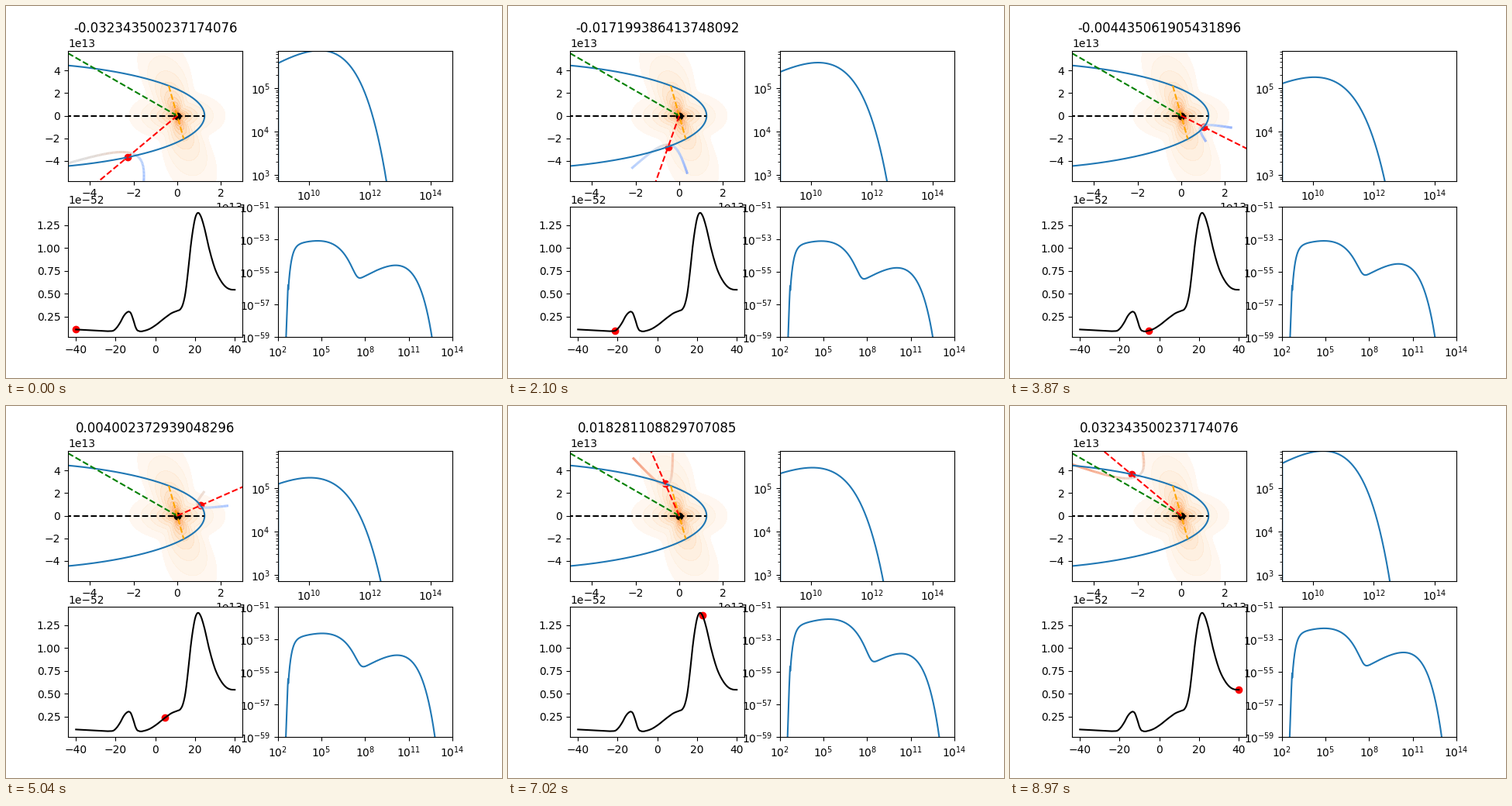
These frames come from a looping animation (640x480 px, 9000 ms). A matplotlib script:

```python
import numpy as np
import matplotlib.pyplot as plt
from matplotlib.animation import FuncAnimation
from matplotlib.collections import LineCollection

FRAMES = 300
PERIOD = 1236.724526          # days
ECC, AXIS = 0.87, 9.64e13     # orbit shape, cm
LATUS = AXIS * (1 - ECC**2)
DISK = np.radians(98.3)
DISK_WIDTH, DISK_GAIN = np.radians(10), 9.5
OBSERVER = np.array([-5, 5.53]) / np.hypot(5, 5.53)
LN10 = np.log(10)


def hermite(x, xs, ys):
    """Smooth curve through a few points."""
    xs, ys = np.asarray(xs, float), np.asarray(ys, float)
    m = np.gradient(ys, xs)
    i = np.clip(np.searchsorted(xs, x) - 1, 0, len(xs) - 2)
    h = xs[i + 1] - xs[i]
    u = (x - xs[i]) / h
    return ((1 + 2 * u) * (1 - u)**2 * ys[i] + u * (1 - u)**2 * h * m[i]
            + u**2 * (3 - 2 * u) * ys[i + 1] + u**2 * (u - 1) * h * m[i + 1])


def position(phase):
    mean = 1.042 * 2 * np.pi * phase
    E = np.sign(mean) * np.abs(6 * mean)**(1 / 3)
    for _ in range(40):
        E = E - (E - ECC * np.sin(E) - mean) / (1 - ECC * np.cos(E))
    return AXIS * np.column_stack([np.cos(E) - ECC,
                                   np.sqrt(1 - ECC**2) * np.sin(E)])


def disk_weight(angle):
    off = np.arcsin(np.sin(angle - DISK))
    return np.exp(-off**2 / (2 * DISK_WIDTH**2))


def polar(r, angle):
    return r * np.cos(angle), r * np.sin(angle)


def hump(w, c, q):
    """Drop in decades away from a peak: power law left, cutoff right."""
    return c * (10**(q * w) - 1 - q * w * LN10)


def shock(pos, weight):
    """Both arms of the wind collision surface, with line colours."""
    D = np.hypot(*pos)
    d = pos / D
    n = np.array([-d[1], d[0]])
    beta = 1 / (94 * (1 + DISK_GAIN * weight))
    t1 = np.linspace(0.01, np.pi - 0.06, 500)
    R = beta * (1 - t1 / np.tan(t1))
    t2 = np.sqrt(7.5 * (np.sqrt(1 + 0.8 * R) - 1))
    keep = t1 + t2 < np.pi - 0.05
    t1, t2 = t1[keep], t2[keep]
    r = np.sin(t2) / np.sin(t1 + t2)
    along, across = 1 - r * np.cos(t1), r * np.sin(t1)
    s = np.r_[0, np.cumsum(np.hypot(np.diff(along), np.diff(across)))]
    grid = np.linspace(0, 1, 50)
    along, across = np.interp(grid, s, along), np.interp(grid, s, across)
    gamma = 1 + 0.2 * (grid[1:] + grid[:-1]) / 2
    speed = np.sqrt(1 - gamma**-2)
    segs, cols = [], []
    for side in (1, -1):
        p = D * (along[:, None] * d + side * across[:, None] * n)
        step = np.diff(p, axis=0)
        cosine = step @ OBSERVER / np.hypot(*step.T)
        doppler = 1 / (gamma * (1 - speed * cosine))
        segs.append(np.stack([p[:-1], p[1:]], axis=1))
        cols.append(plt.cm.coolwarm(0.5 + 0.5 * np.log(doppler)))
    return np.concatenate(segs), np.concatenate(cols)


# light curve, units of 1e-52
LC_T = [-40, -35, -28, -23, -21, -19.4, -17.3, -16.1, -14.6, -13.3, -12.4,
        -11.2, -10, -9.2, -8.3, -5.2, -3, 0, 4.9, 8, 11, 12.6, 13.8, 15,
        16.5, 17.7, 19, 20.2, 21.4, 22.8, 24.4, 27, 30, 33, 36, 38, 40]
LC_V = [.108, .102, .094, .0905, .097, .13, .2, .25, .29, .303, .288,
        .22, .135, .102, .091, .096, .113, .153, .237, .285, .313, .33, .38, .49,
        .75, 1.0, 1.21, 1.34, 1.385, 1.352, 1.245, 1.0, .775, .64, .565, .546, .543]

days = np.linspace(-40, 40, FRAMES)
phases = days / PERIOD
track = position(phases)
dist = np.log10(np.hypot(*track.T) / 1e13)
weights = disk_weight(np.arctan2(track[:, 1], track[:, 0]))
flux = hermite(days, LC_T, LC_V)

# peaks of the two humps of the photon spectrum
KEYS = [-40, -28.2, -14.6, -5.2, 4.9, 22.8, 40]
syn_pos = np.interp(days, [-40, -28, -5, 5, 40],
                    [4.74, 4.74, 4.9, 5.06, 4.9]) + 0.45 * weights
syn_top = np.log10(flux) - 52.12 + 0.36 * (syn_pos - 4.74)
ic_pos = hermite(days, KEYS, [10.1, 10.05, 10.05, 10.02, 10.2, 10.345, 10.365])
ic_top = hermite(days, KEYS, [-54.59, -54.61, -54.8, -54.49, -53.97, -53.87, -53.8])

energy = np.linspace(2.3, 14, 900)
lorentz = np.linspace(0, 4.5, 250)


def photons(i):
    v = energy
    g = weights[i]
    low = 5.4 * 10**(-2.1 * (v - 2.585))
    bump = np.where(v < 2.725, 0.45 * np.clip((v - 2.6) / 0.1, 0, 1), 0)
    syn = (syn_top[i] + bump - low
           - hump(v - syn_pos[i], 0.32 + 0.08 * g, 0.39 - 0.04 * g))
    ic = ic_top[i] - hump(v - ic_pos[i], 0.57, 0.42) - low / 3
    return np.maximum(10**syn + 10**ic, 1e-70)


def electrons(i):
    l, g = dist[i], weights[i]
    top = 5.047 + 1.29 * l - 0.19 * g
    start = 4.95 + 0.984 * l - 0.075 * g
    peak = min(1.05 + 0.82 * (l - 0.158), 1.36) - 0.27 * g
    q = 0.425 + 0.09 * (l - 0.158) + 0.025 * g
    c = (top - start) / hump(-peak, 1, q)
    y = 10**np.maximum(top - hump(lorentz - peak, c, q), 0)
    return np.r_[1, y]


fig, ((ax, ax_e), (ax_l, ax_s)) = plt.subplots(2, 2, figsize=(6.4, 4.8), dpi=100)

# orbit view
gx, gy = np.meshgrid(np.linspace(-5e13, 3e13, 240), np.linspace(-5.8e13, 5.8e13, 240))
gr = np.maximum(np.hypot(gx, gy) / 1e13, 0.05)
press = np.log10((1 + DISK_GAIN * disk_weight(np.arctan2(gy, gx))) / gr**2)
levels = -2 * np.log10(2.2) + 0.25 * np.arange(11)
ax.contourf(gx, gy, press, levels=levels, alpha=0.6, extend='max',
            colors=plt.cm.Oranges(np.linspace(0.02, 0.55, 11)))
ax.scatter(0, 0, color='k')
pulsar = ax.scatter(0, 0, color='r')
arms = ax.add_collection(LineCollection([], linewidths=2.2), autolim=False)

nu = np.linspace(-2.9, 2.9, 600)
ax.plot(*polar(LATUS / (1 + ECC * np.cos(nu)), nu))
ax.plot([-AXIS * (1 + ECC), AXIS * (1 - ECC)], [0, 0], 'k--')
ax.plot([0, 2e14 * OBSERVER[0]], [0, 2e14 * OBSERVER[1]], 'g--')
ends = np.array([DISK, DISK + np.pi])
ax.plot(*polar(LATUS / (1 + ECC * np.cos(ends)), ends), color='orange', ls='--')
ray, = ax.plot([], [], 'r--')
ax.set_xlim(-5e13, 3e13)
ax.set_ylim(-5.76e13, 5.76e13)
title = ax.set_title('')

# electron spectrum
spec_e, = ax_e.loglog(10**(9 + np.r_[0, lorentz]), electrons(0))
ax_e.set_xlim(9.6e8, 5.1e14)
ax_e.set_ylim(7.3e2, 7.3e5)

# light curve
fine = np.linspace(-40, 40, 400)
ax_l.plot(fine, hermite(fine, LC_T, LC_V) * 1e-52, 'k')
mark = ax_l.scatter(0, 5e-53, color='r')
ax_l.set_xlim(-44, 44)
ax_l.set_ylim(0.0248e-52, 1.4504e-52)

# photon spectrum
spec_s, = ax_s.loglog(10**energy, photons(0))
ax_s.set_xlim(1e2, 1e14)
ax_s.set_ylim(1e-59, 1e-51)


def update(i):
    pos = track[i]
    title.set_text(str(float(phases[i])))
    pulsar.set_offsets([pos])
    far = pos / np.hypot(*pos) * 2e14
    ray.set_data([0, far[0]], [0, far[1]])
    segs, cols = shock(pos, weights[i])
    arms.set_segments(segs)
    arms.set_color(cols)
    spec_e.set_ydata(electrons(i))
    mark.set_offsets([[days[i], flux[i] * 1e-52]])
    spec_s.set_ydata(photons(i))
    return title, pulsar, ray, arms, spec_e, mark, spec_s


anim = FuncAnimation(fig, update, frames=FRAMES, interval=30,
                     repeat=True, repeat_delay=0)
plt.show()
```
